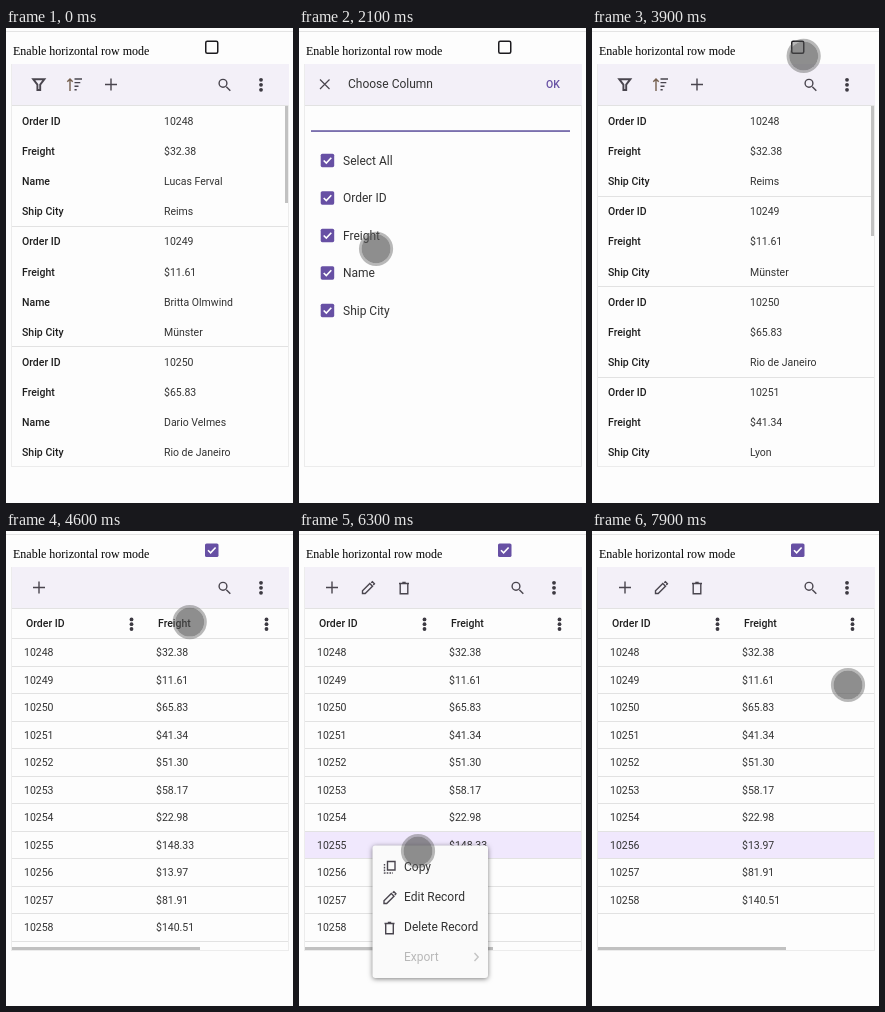
These frames come from a looping animation (287x475 px, 8 s). An HTML page:

```html
<!DOCTYPE html>
<html lang="en">
<head>
<meta charset="utf-8">
<title>Adaptive grid</title>
<style>
  html, body { margin: 0; width: 100%; height: 100%; overflow: hidden; background: #fdfdfd; }
  svg { display: block; position: absolute; left: 0; top: 0; }
  text { font: 400 10.5px Roboto, sans-serif; fill: #333; white-space: pre; }
  .bold { font-weight: 500; fill: #1f1f1f; }
  .big { font-size: 12px; }
  .label { font: 12px "Liberation Serif", serif; fill: #000; }
  .icon { fill: none; stroke: #49454e; stroke-width: 1.4; }
  .float { filter: drop-shadow(0 1px 2.5px rgba(0, 0, 0, .5)); }
</style>
</head>
<body>
<svg id="stage" width="287" height="475" viewBox="0 0 287 475"></svg>
<script>
const LOOP = 8000, STEP = 100;
const PURPLE = '#6750a4', LINE = '#e2e2e2', EDGE = '#ececec', BAR = '#f3f0f8';

// Markup helpers
const rect = (x, y, w, h, fill, more = '') =>
  `<rect x="${x}" y="${y}" width="${w}" height="${h}" fill="${fill}" ${more}/>`;
const text = (x, y, s, cls = '', fill = '') =>
  `<text x="${x}" y="${y}" class="${cls}" ${fill && `style="fill:${fill}"`}>${s}</text>`;
const icon = (d, more = '') => `<path class="icon" d="${d}" ${more}/>`;
const rule = y => rect(6, Math.round(y), 276, 1, LINE);
const dots = (x, y, gap) => [-gap, 0, gap]
  .map(d => `<circle cx="${x}" cy="${y + d}" r="1.9" fill="#3d3a42"/>`).join('');

const plus = x => icon(`M${x - 6} 56.5h12M${x} 50.5v12`);
const search = icon('M220.3 58.8l4 4') + '<circle class="icon" cx="217" cy="55.3" r="3.9"/>';
const filterIcon = icon('M27.2 51.2h11.2l-4.2 5.4v5.4h-2.8v-5.4z', 'style="stroke-width:1.9"');
const sortIcon = icon('M64 63v-12M61.3 53.7l2.7-2.8 2.7 2.8', 'style="stroke:#75604f"') +
  icon('M68.5 51h7.5M68.5 54.6h5.8M68.5 58.2h4M68.5 61.8h2.2');
const pencil = (x, y) => icon(
  `M${x - 5.5} ${y + 5.5}v-2.7l7.3-7.3 2.7 2.7-7.3 7.3zM${x + 3.2} ${y - 5.2}l1.2-1 2 2-1.1 1.2`);
const trash = (x, y) => icon(
  `M${x - 5} ${y - 4.5}h10M${x - 1.7} ${y - 5.6}h3.4M${x - 3.8} ${y - 4}v9.8h7.6v-9.8`);
const copyIcon = (x, y) => icon(`M${x - 2.5} ${y - 5.5}h7.5v8.5h-7.5z`) +
  icon(`M${x - 5.5} ${y - 3}v9h8.5`, 'stroke-dasharray="1.6 1.2"');

function box(x, y, state) {
  if (state === 'off') return rect(x + .75, y + .75, 12, 12, 'none', 'rx="1.5" stroke="#1c1b1f" stroke-width="1.5"');
  const mark = state === 'on' ? 'l2.6 2.6 5-5.4' : 'h7.5';
  return rect(x, y, 13.5, 13.5, PURPLE, 'rx="1.6"') +
    `<path d="M${x + 3} ${y + 6.8}${mark}" fill="none" stroke="#fff" stroke-width="1.6"/>`;
}

const frame = h => rect(5.5, 36.5, 277, h, '#fdfdfd', `stroke="${EDGE}"`) + rect(6, 36, 277, 41, BAR) + rule(77);
const tools = left => left + search + dots(255, 56.8, 5);

const fields = ['Order ID', 'Freight', 'Name', 'Ship City'];
const freights = [32.38, 11.61, 65.83, 41.34, 51.3, 58.17, 22.98, 148.33, 13.97, 81.91, 140.51];
const names = ['Lucas Ferval', 'Britta Olmwind', 'Dario Velmes'];
const cities = ['Reims', 'Münster', 'Rio de Janeiro', 'Lyon'];
const records = freights.map((f, i) => [10248 + i, '$' + f.toFixed(2), names[i], cities[i]]);

function cards(count, shown, thumb) {
  const pitch = 30.1;
  let s = frame(402) + tools(filterIcon + sortIcon + plus(105));
  for (let r = 0; r < count; r++) {
    const top = r * shown.length * pitch;
    if (r) s += rule(77.6 + top);
    shown.forEach((f, i) => {
      const y = Math.round(97 + top + i * pitch);
      s += text(16, y, fields[f], 'bold') + text(158, y, records[r][f]);
    });
  }
  return s + rect(279, 78, 3, thumb, '#c1c1c1');
}

function table(rows, selected) {
  const pitch = 27.5;
  let s = frame(383) + tools(plus(33) + (selected ? pencil(69, 57) + trash(105, 57) : ''));
  s += text(20, 96, 'Order ID', 'bold') + text(152, 96, 'Freight', 'bold') +
    dots(125.5, 93.2, 4.8) + dots(260.5, 93.2, 4.8) + rule(107);
  if (selected) s += rect(6, 300, 276, 27.5, '#f0e8fd');
  rows.forEach(([id, freight], i) => {
    const y = Math.round(125 + i * pitch);
    s += text(18, y, id) + text(150, y, freight) + rule(134.5 + i * pitch);
  });
  return s + rect(6, 416, 188, 3, '#c1c1c1');
}

function dialog(changed) {
  let s = frame(402) + icon('M21 51.5l9.5 9.5M30.5 51.5l-9.5 9.5', 'style="stroke-width:1.2"') +
    text(49, 60, 'Choose Column', 'big') + text(247, 60, 'OK', 'bold', PURPLE) +
    rect(12, 102.3, 259, 1.5, '#5c4f9c');
  if (changed) s += rect(11, 226, 259, 36, '#f4f2f9');
  ['Select All', ...fields].forEach((name, i) => {
    const y = 132.5 + i * 37.5;
    const state = changed && name === 'Name' ? 'off' : changed && i === 0 ? 'mixed' : 'on';
    s += box(21.7, y - 6.8, state) + text(44, Math.round(y + 4), name, 'big');
  });
  return s;
}

const popup = rect(239, 40, 33, 33, '#faf9fd', 'rx="3.5" stroke="#1c1b1f" stroke-width="1.8"') + dots(255, 56.8, 5) +
  rect(173.5, 66, 89.5, 43, '#f9f9f9', 'rx="3" class="float"') + text(205.5, 91, 'Columns', 'big', '#666');

const menu = rect(73.5, 314.5, 115.5, 132.5, '#fafafa', 'rx="3" class="float"') +
  copyIcon(91, 336) + pencil(90.5, 367) + trash(90.5, 397) +
  ['Copy', 'Edit Record', 'Delete Record', 'Export'].map((s, i) =>
    text(105, 340 + i * 30, s, 'big', s === 'Export' ? '#b8b8b8' : '')).join('') +
  icon('M175.5 422l3.7 4-3.7 4', 'style="stroke:#c4c4c4"');

const touch = '<circle r="15.8" fill="none" stroke="rgba(90,90,90,.42)" stroke-width="2.6"/>' +
  '<circle r="14.5" fill="rgba(80,80,80,.64)"/>';

// Moments when the view changes
const OPEN = 800, CHOOSE = 1500, UNTICK = 2500, APPLY = 3100, SWITCH = 4300, HOLD = 6000, REMOVE = 7200;
const FADE = 400;

// Layers from back to front: markup, start, end, fade in, fade out
const layers = [
  [rect(0, 3, 287, 1, '#e4e4e4') + text(7, 27, 'Enable horizontal row mode', 'label')],
  [box(199, 12.5, 'off'), 0, SWITCH],
  [box(199, 12.5, 'on'), SWITCH],
  [cards(3, [0, 1, 2, 3], 97), 0, APPLY],
  [cards(4, [0, 1, 3], 130), APPLY, SWITCH],
  [table(records, false), SWITCH, HOLD],
  [table(records, true), HOLD, REMOVE],
  [table(records.filter(r => r[0] !== 10255), true), REMOVE],
  [popup, OPEN, CHOOSE + FADE, FADE],
  [dialog(false), CHOOSE, UNTICK, FADE],
  [dialog(true), UNTICK, APPLY + 2 * FADE, 0, FADE],
  [menu, HOLD - STEP, REMOVE, FADE, FADE],
  [touch, STEP, LOOP]
];

// Touch point: each move eases out to x, y between two times
const moves = [
  [100, 500, 254, 59], [900, 1400, 240, 78], [1650, 2400, 46, 248], [UNTICK, 3100, 257, 59],
  [3300, 4200, 206, 24], [4500, 5200, 122, 277], [5200, 5400, 119, 323], [HOLD, 6300, 119, 320],
  [6600, 7000, 132, 392], [7500, 7900, 256, 154]
];

const stage = document.getElementById('stage');
stage.innerHTML = layers.map(([markup]) => `<g>${markup}</g>`).join('');
const groups = [...stage.children];
const clamp = v => Math.max(0, Math.min(1, v));
const easeOut = u => 1 - (1 - u) ** 2;

function opacity(t, start = 0, end = LOOP, fadeIn = 0, fadeOut = 0) {
  if (t < start || t >= end) return 0;
  return clamp(fadeIn ? (t - start) / fadeIn : 1) * clamp(fadeOut ? (end - t) / fadeOut : 1);
}

function touchAt(t) {
  let x = 266, y = 63;
  for (const [start, end, toX, toY] of moves) {
    const p = easeOut(clamp((t - start) / (end - start)));
    x += (toX - x) * p;
    y += (toY - y) * p;
  }
  return [x, y];
}

function draw(now) {
  const t = Math.floor((now % LOOP) / STEP) * STEP;
  layers.forEach(([, ...times], i) => {
    const alpha = opacity(t, ...times);
    groups[i].style.display = alpha ? '' : 'none';
    groups[i].setAttribute('opacity', alpha);
  });
  groups[groups.length - 1].setAttribute('transform', `translate(${touchAt(t)})`);
}

const start = performance.now();
function tick() {
  draw(performance.now() - start);
  requestAnimationFrame(tick);
}
tick();
</script>
</body>
</html>
```
